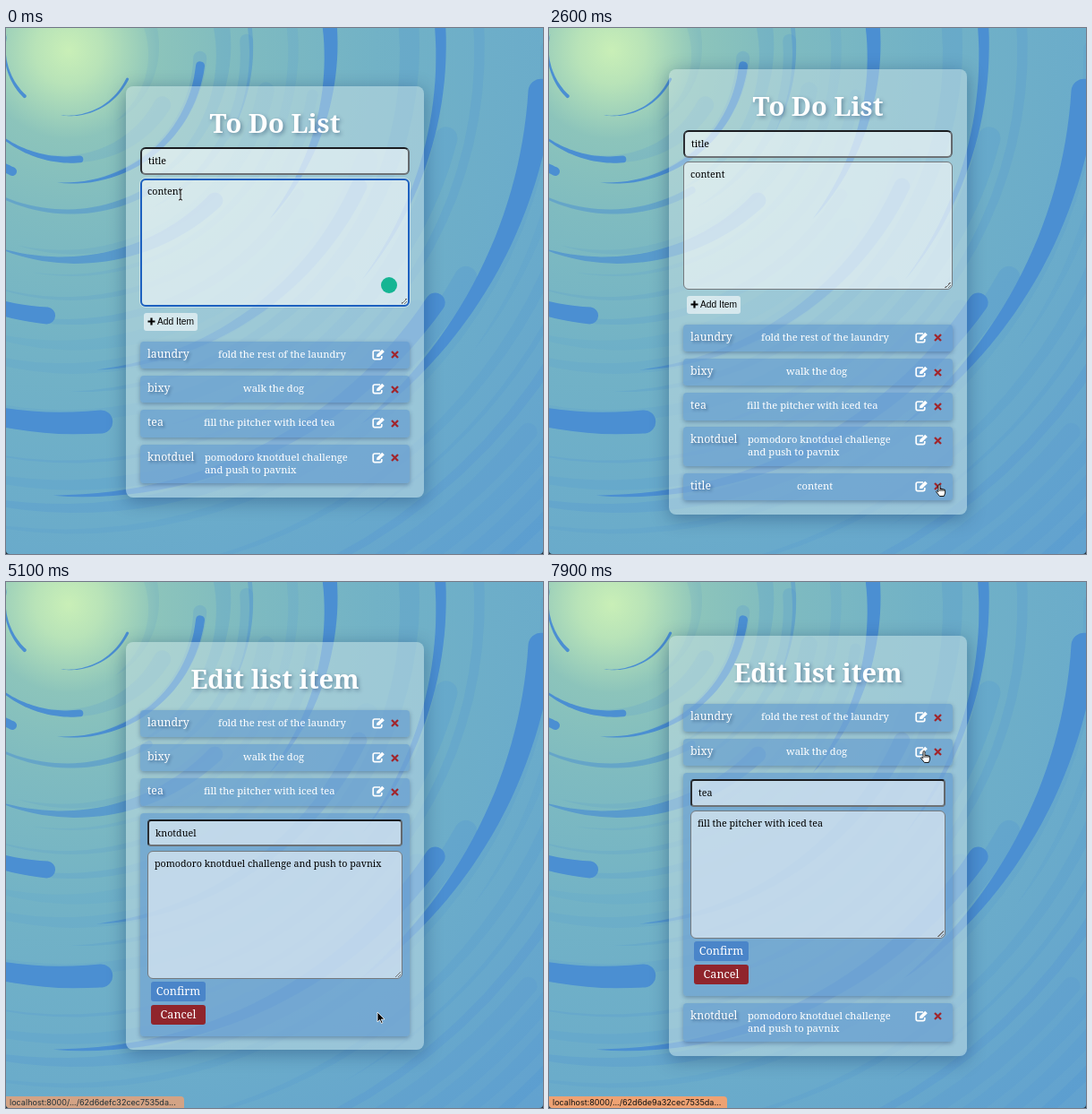
These frames come from a looping animation (600 px wide and 587 px high, 8000 ms). An HTML page:

```html
<!DOCTYPE html>
<html lang="en">
<head>
<meta charset="utf-8">
<title>To Do List</title>
<style>
html, body { margin: 0; width: 100%; height: 100%; overflow: hidden; background: #22303a; }
#stage { position: relative; width: 600px; height: 587px; overflow: hidden; border-radius: 0 0 4px 4px;
  font: 500 10.7px/14px "Noto Serif", serif; white-space: nowrap; }
#stage > svg { position: absolute; left: 0; top: 0; }
#wrap { position: absolute; left: 134px; top: 0; width: 333px; height: 589px; display: flex; align-items: center; }
#card { box-sizing: border-box; width: 333px; padding: 0 16px 15.5px; border-radius: 8px;
  background: rgba(205,225,231,.48); box-shadow: 0 4px 20px rgba(10,40,90,.38); }
h1 { margin: 0; height: 67.8px; font-size: 29px; line-height: 82.5px; text-align: center; color: #fff;
  text-shadow: 2px 2px 4px rgba(0,30,70,.35); }
.edit h1 { margin-bottom: 8.2px; }
.field, .area { position: relative; box-sizing: border-box; background: rgba(255,255,255,.55); border-radius: 6px; color: #000; }
.field { height: 30.5px; border: 2px solid; border-color: #1a1c20 #63686d #6d7276 #2b2e33; padding: 6px 7px; margin-bottom: 4.7px; }
.form .field { border-radius: 4px; }
.area { height: 142.5px; border: 1px solid #74797d; padding: 6px 7px; }
.area::after { content: ""; position: absolute; right: 1px; bottom: 1px; width: 7px; height: 7px;
  background: linear-gradient(135deg, transparent 50%, #777 50% 58%, transparent 58% 72%, #777 72% 82%, transparent 82%); }
.focus { border: 2px solid #1c60bf; padding: 5px 6px; box-shadow: 0 0 0 1px rgba(235,245,250,.5); }
.dot { position: absolute; right: 12.5px; bottom: 12.5px; width: 18px; height: 18px; border-radius: 50%; background: #15b593; }
.add { margin: 7px 0 12px 4px; width: 60px; height: 20px; border-radius: 3px; background: rgba(255,255,255,.58);
  position: relative; font: 10.25px/20px "Liberation Sans", Arial, sans-serif; text-indent: 15px; }
.add svg { position: absolute; left: 4px; top: 5.5px; }
.row, .form { position: relative; border-radius: 4px; background: rgba(88,146,206,.56); color: #fff;
  box-shadow: 0 2px 5px rgba(10,40,90,.36); margin-bottom: 7.9px; }
.row { height: 30.3px; }
.row.tall { height: 43.5px; }
.row > *, .form > b { position: absolute; }
.row:last-child, .form:last-child { margin-bottom: 0; }
.name { left: 8px; font-size: 12.3px; line-height: 28.5px; text-shadow: 2px 2px 3px rgba(0,30,70,.4); }
.text { top: 7px; font-size: 11.2px; }
.pen { left: 259px; top: 8px; }
.cross { left: 280px; top: 10.5px; }
.form { box-sizing: border-box; height: 249px; padding: 7.3px 8px; }
.form b { left: 12px; width: 61px; height: 22px; border-radius: 3px; text-align: center; font: 500 12.6px/22px "Noto Serif", serif; }
.ok { top: 188.6px; background: #4a85c9; }
.no { top: 214.4px; background: #90252c; }
#status { position: absolute; left: 0; bottom: 0; width: 195px; height: 13.5px; padding-left: 4px; border-radius: 0 4px 0 0;
  background: #eea273; color: #111; font: 9.05px/13.5px Inter, sans-serif; }
</style>
</head>
<body>
<div id="stage">
  <svg id="back" width="600" height="587"></svg>
  <div id="wrap"><div id="card"></div></div>
  <div id="status"></div>
  <svg width="600" height="587"><g id="cursor"></g></svg>
</div>
<script>
const $ = id => document.getElementById(id);

// Background: tapered arcs around one centre
const CX = 70, CY = 25;
function swirl(r, from, to, w, alpha = 1) {
  const outer = [], inner = [], n = 30;
  const at = (a, d) => (CX + d * Math.cos(a)).toFixed(1) + ' ' + (CY + d * Math.sin(a)).toFixed(1);
  for (let i = 0; i <= n; i++) {
    const a = (from + (to - from) * i / n) * Math.PI / 180, h = w / 2 * (1 - i / n) ** 0.75;
    outer.push(at(a, r + h));
    inner.unshift(at(a, r - h));
  }
  return `<path fill="#4b8fd2" opacity="${alpha}" d="M${outer.join('L')}L${inner.join('L')}A${w / 2} ${w / 2} 0 0 1 ${outer[0]}Z"/>`;
}
let seed = 11;
const rnd = () => (seed = seed * 16807 % 2147483647) / 2147483647;

function backdrop() {
  const stops = [[0, '#c9efb7'], [.05, '#b8e3b8'], [.13, '#8cc4bb'], [.25, '#7fbbc0'], [.45, '#72b2c6'], [.7, '#6bacca'], [1, '#62a2cf']];
  let s = `<radialGradient id="sky" gradientUnits="userSpaceOnUse" cx="${CX}" cy="${CY}" r="760">` +
    stops.map(([o, c]) => `<stop offset="${o}" stop-color="${c}"/>`).join('') +
    '</radialGradient><rect width="600" height="587" fill="url(#sky)"/>';
  for (let i = 0; i < 26; i++) {
    const from = -30 + rnd() * 70;
    s += swirl(95 + i * 26, from, from + 60 + rnd() * 60, 12 + rnd() * 14, .1 + rnd() * .13);
  }
  const arcs = [
    [71, 134, 195, 4], [73, 26, 97, 3], [148, 6.6, 95, 10], [122, 84, 135, 8], [149, 115, 150, 10],
    [180, 60, 130, 8, .5], [234, 45.7, 110, 18, .7], [297, 94.6, 150, 19], [416, 85, 150, 26],
    [497, 34.5, 92, 22], [358, 25, 85, 18, .7], [530, 5, 52, 29], [293, -12, 40, 18],
    [416, -12, 38, 14], [204, -20, 30, 6, .4]
  ];
  return s + arcs.map(a => swirl(...a)).join('');
}
$('back').innerHTML = backdrop();

// Page contents
const items = [
  { name: 'laundry', text: 'fold the rest of the laundry', x: 87 },
  { name: 'bixy', text: 'walk the dog', x: 115 },
  { name: 'tea', text: 'fill the pitcher with iced tea', x: 71 },
  { name: 'knotduel', text: 'pomodoro knotduel challenge<br>and push to pavnix', x: 72, tall: true },
  { name: 'title', text: 'content', x: 127 }
];
const icons = `<svg class="pen" width="15" height="13"><path d="M9 2H3Q1.2 2 1.2 3.8V9.8Q1.2 11.6 3 11.6H9Q10.8 11.6 10.8 9.8V8" fill="none" stroke="#fff" stroke-width="1.7"/><path d="M5 9L5.4 6.4 11.2.7 13.8 3.2 8 9Z" fill="#fff"/></svg>
<svg class="cross" width="9" height="9"><path d="M1 1L8 8M8 1L1 8" stroke="#a1262d" stroke-width="2.3"/></svg>`;
const plus = '<svg width="9" height="9"><path d="M4.5 .5V8.5M.5 4.5H8.5" stroke="#000" stroke-width="2.2"/></svg>';
const row = it => `<div class="row${it.tall ? ' tall' : ''}"><span class="name">${it.name}</span>` +
  `<span class="text" style="left:${it.x}px">${it.text}</span>${icons}</div>`;
const fields = (name, text, cls = '', extra = '') =>
  `<div class="field">${name}</div><div class="area ${cls}">${text}${extra}</div>`;
const form = it => `<div class="form">${fields(it.name, it.text.replace('<br>', ' '))}<b class="ok">Confirm</b><b class="no">Cancel</b></div>`;
const listPage = (count, focus) => '<h1>To Do List</h1>' +
  fields('title', 'content', focus ? 'focus' : '', focus ? '<i class="dot"></i>' : '') +
  `<div class="add">${plus}Add Item</div>` + items.slice(0, count).map(row).join('');
const editPage = k => '<h1>Edit list item</h1>' +
  items.slice(0, 4).map((it, i) => i === k ? form(it) : row(it)).join('');

const pages = [
  [0, listPage(4, true)], [1200, listPage(5)], [3500, listPage(4)],
  [5000, editPage(3)], [7000, editPage(2)]
];

// Link previews: appear, start of fade, end of fade, id
const links = [
  [2800, 3600, 4000, 'dfb9'], [4500, 5020, 5420, 'defc'],
  [6400, 7000, 7400, 'deea'], [7700, 9000, 9400, 'de9a']
];

// Pointer: time, x, y
const path = [
  [0, 195, 186], [100, 195, 186], [700, 193, 322], [1400, 193, 322], [2400, 436, 509],
  [3900, 436, 509], [4400, 415, 480], [5200, 415, 480], [6300, 411, 231], [6700, 413, 231],
  [7300, 413, 231], [7700, 419, 188], [8000, 419, 188]
];
const shapes = [
  [0, 'beam'], [600, 'arrow'], [700, 'hand'], [1500, 'arrow'], [2400, 'hand'], [4000, 'arrow'],
  [4300, 'hand'], [5000, 'arrow'], [5400, 'beam'], [6700, 'hand'], [7100, 'beam'], [7500, 'arrow'], [7600, 'hand']
];
const beam = 'd="M-2-6Q0-6 0-4.5V4.5Q0 6-2 6M2-6Q0-6 0-4.5M0 4.5Q0 6 2 6" fill="none"';
const pointers = {
  beam: `<path ${beam} stroke="#fff" stroke-opacity=".6" stroke-width="2.4"/><path ${beam} stroke="#000"/>`,
  arrow: '<path d="M0 0V11L2.6 8.6 4.4 12.6 6 11.9 4.3 8H8Z" stroke="#fff" stroke-width=".8"/>',
  hand: '<path d="M-1 7.5V1.3Q.2-.2 1 1.3V5.5Q2 4.7 3 5.7 4.2 5.1 5 6.1 6.5 5.7 6.6 7.1V10.1L5.3 13.5H.5L-3.5 8.5Q-3.5 6.9-1 8.5ZM1 5.5V8M3 5.7V8M5 6.1V8" fill="#fff" stroke="#000" stroke-width=".9"/>'
};

const latest = (list, t) => list.filter(e => e[0] <= t).pop();
const ease = u => u * u * (3 - 2 * u);
const shown = {};
function put(id, html) {
  if (shown[id] !== html) $(id).innerHTML = shown[id] = html;
}

function draw(now) {
  const t = Math.floor(now % 8000 / 100) * 100;
  const page = latest(pages, t);
  put('card', page[1]);
  $('card').className = page[0] >= 5000 ? 'edit' : '';

  const link = latest(links, t);
  if (link) put('status', `localhost:8000/.../62d6${link[3]}32cec7535da...`);
  $('status').style.opacity = link ? Math.max(0, Math.min(1, (link[2] - t) / (link[2] - link[1]))) : 0;

  const i = path.findIndex(p => p[0] > t), [t0, x0, y0] = path[i - 1], [t1, x1, y1] = path[i];
  const u = ease((t - t0) / (t1 - t0));
  put('cursor', pointers[latest(shapes, t)[1]]);
  $('cursor').setAttribute('transform', `translate(${x0 + (x1 - x0) * u} ${y0 + (y1 - y0) * u})`);
  requestAnimationFrame(draw);
}
draw(0);
</script>
</body>
</html>
```
